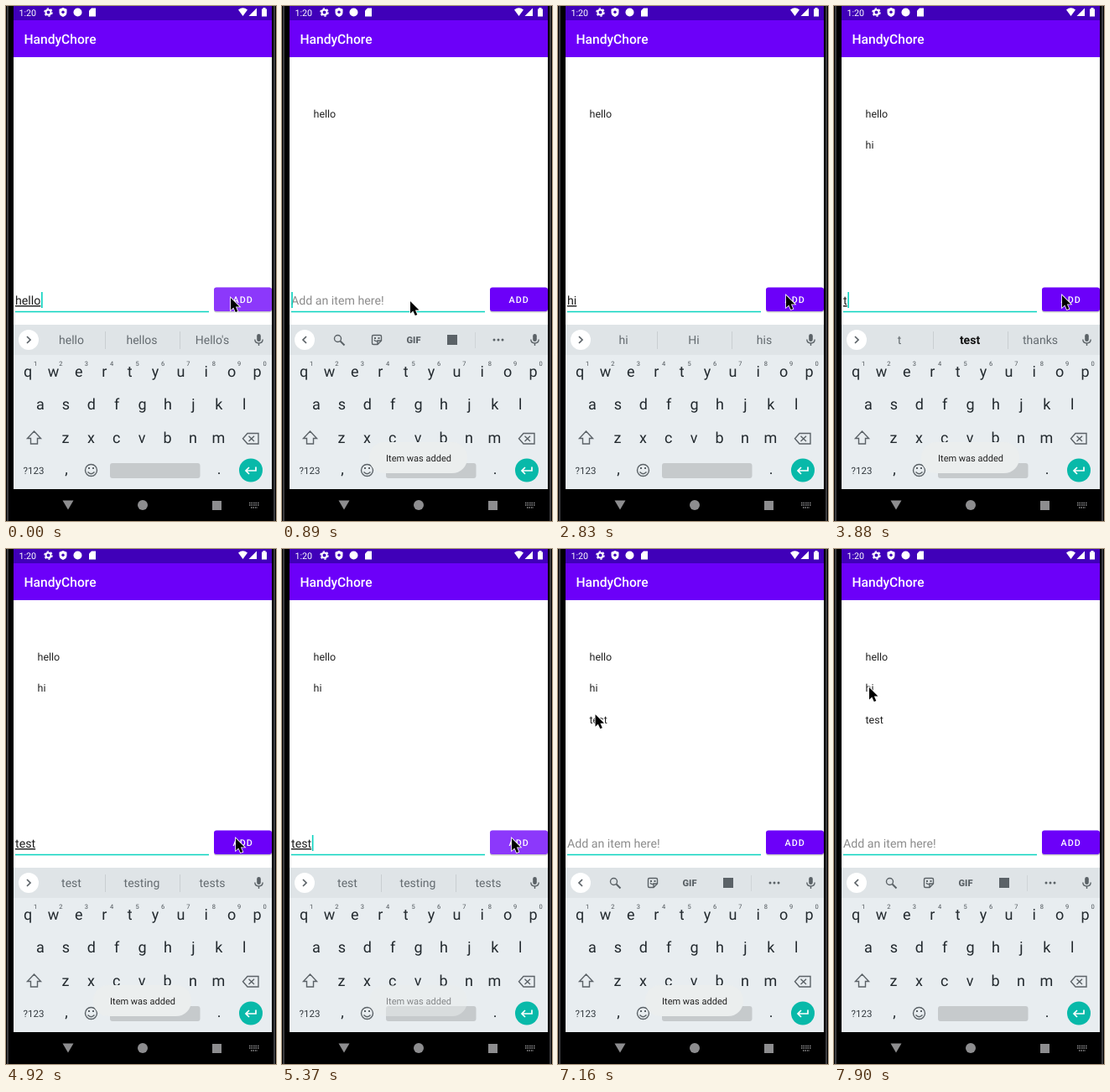
Write an HTML page that moves like this. It is 322 px wide and 614 px high and loops after 8 s.

```html
<!DOCTYPE html>
<html lang="en">
<head>
<meta charset="utf-8">
<style>
  html, body { margin: 0; width: 100%; height: 100%; overflow: hidden; background: #000; }
  svg { display: block; width: 322px; height: 614px; font-family: Roboto, sans-serif; text-rendering: geometricPrecision; }
  .mid { text-anchor: middle; }
  .line { fill: none; stroke: #5b6267; stroke-width: 1.4; }
  .icon { fill: #5b6267; }
  .key { font-size: 18px; fill: #22292e; text-anchor: middle; }
  .digit { font-size: 7.5px; fill: #4c5358; text-anchor: middle; }
  .word { font-size: 14px; fill: #646b70; text-anchor: middle; }
  .item { font-size: 12.5px; fill: #222; }
</style>
</head>
<body>
<svg viewBox="0 0 322 614">
  <!-- device and app -->
  <rect width="322" height="614"/>
  <path d="M2 0V614M320 0V614" stroke="#3c3c40" stroke-width="2"/>
  <rect x="9" width="308" height="17" fill="#4000b9"/>
  <rect x="9" y="17" width="308" height="44" fill="#6c00f9"/>
  <rect x="9" y="61" width="308" height="319" fill="#fff"/>
  <g fill="#fff">
    <text x="15.5" y="11.5" font-size="10.7">1:20</text>
    <circle cx="50.5" cy="7.5" r="3" fill="none" stroke="#fff" stroke-width="2"/>
    <circle cx="50.5" cy="7.5" r="4.6" fill="none" stroke="#fff" stroke-width="1.4" stroke-dasharray="2.4 2.4"/>
    <path d="M68 2L72.500 3.800V7.500Q72.500 11.500 68 13Q63.500 11.500 63.500 7.500V3.800Z"/>
    <circle cx="68" cy="7.300" r="1.700" fill="#4000b9"/>
    <circle cx="85.500" cy="7.500" r="5"/>
    <path d="M102 2.500H107V12.500H99V5.500Z"/>
    <path d="M277 4.500Q282.500 0 288 4.500L282.500 12Z"/>
    <path d="M299 2.500V12H289.500Z"/>
    <path d="M305 3.500H306.500V2H309.500V3.500H311V12.500H305Z"/>
    <text x="21.500" y="45" font-size="15.600" font-weight="500">HandyChore</text>
  </g>
  <g id="items"></g>
  <path d="M11 364.500H242" stroke="#0ad3c0" stroke-width="1.500"/>
  <text id="hint" x="11" y="356" font-size="14.200" fill="#8c8c8c">Add an item here!</text>
  <text id="input" x="11" y="356" font-size="14.200" fill="#1c1c1c" text-decoration="underline"></text>
  <rect id="caret" y="341" width="1.600" height="19" fill="#0ad3c0"/>
  <rect x="248" y="336.500" width="69" height="29" rx="3" fill="#000" opacity=".2"/>
  <rect x="248" y="335.500" width="69" height="28.500" rx="3" fill="#6c00f9"/>
  <rect id="ripple" x="248" y="335.500" width="69" height="28.500" rx="3" fill="#fff"/>
  <text x="270.500" y="354" font-size="10.800" font-weight="500" letter-spacing=".95" fill="#fff">ADD</text>

  <!-- keyboard -->
  <rect x="9" y="380" width="308" height="196" fill="#e8edf0"/>
  <rect x="9" y="380" width="308" height="36" fill="#dfe4e7"/>
  <circle cx="27" cy="398" r="12" fill="#fff"/>
  <path id="chevron" d="M-2 -4L2 0L-2 4" class="line" style="stroke-width:1.700"/>
  <g id="words">
    <path d="M118.500 388V409M207.500 388V409" stroke="#c9ced1"/>
    <text class="word" x="78" y="403"></text>
    <text class="word" x="162" y="403"></text>
    <text class="word" x="246" y="403"></text>
  </g>
  <g id="tools">
    <circle class="line" cx="66.500" cy="396.500" r="4"/>
    <path class="line" d="M69.500 399.500L74.500 404.500" style="stroke-width:2"/>
    <path class="line" d="M109 392.500H117Q118.500 392.500 118.500 394V399L114 403.500H109Q107.500 403.500 107.500 402V394Q107.500 392.500 109 392.500ZM114 403.500V399H118.500M110 398Q112 401 114.500 398.500"/>
    <path class="icon" d="M110 395h2v2h-2zM114.500 395h2v2h-2z"/>
    <text class="icon mid" x="157" y="402" font-size="11" font-weight="800">GIF</text>
    <rect class="icon" x="197" y="392" width="12" height="12"/>
    <path d="M230.500 389V408" stroke="#cfd4d7"/>
    <g class="icon"><circle cx="253" cy="398" r="1.500"/><circle cx="258" cy="398" r="1.500"/><circle cx="263" cy="398" r="1.500"/></g>
  </g>
  <rect class="icon" x="299.200" y="391" width="4.600" height="9" rx="2.300"/>
  <path class="line" d="M296.800 397.500Q297 402 301.500 402T306.200 397.500M301.500 402V405"/>
  <g id="keys"></g>
  <path class="line" d="M33.500 507L41.500 515.500H37.500V522H29.500V515.500H25.500Z"/>
  <path class="line" d="M288 509.500H301V522H288L282.500 515.800ZM289.500 512.700L296 519M296 512.700L289.500 519"/>
  <text class="mid" x="33" y="558" font-size="11.500" fill="#333a3f">?123</text>
  <circle class="line" cx="101.500" cy="553.500" r="7"/>
  <path class="line" d="M97.500 555.500Q101.500 560 105.500 555.500"/>
  <path class="icon" d="M98 550h2v2h-2zM103 550h2v2h-2z"/>
  <rect x="124" y="545" width="107.500" height="18" rx="3" fill="#c6cacc"/>
  <circle cx="292" cy="553.500" r="14" fill="#08b9a9"/>
  <path d="M298 549.500V554H286.500M290 550L286 554L290 558" fill="none" stroke="#fff" stroke-width="1.700"/>

  <!-- navigation bar -->
  <g fill="#8d8d8f">
    <path d="M67.500 589.500H80.500L74 600.500Z"/>
    <circle cx="163" cy="595" r="6"/>
    <rect x="246" y="590" width="11" height="11"/>
    <path d="M290 592.500H302M290 595H302M292 598H300" fill="none" stroke="#8d8d8f" stroke-width="1.500" stroke-dasharray="1.500 1"/>
  </g>

  <g id="toast">
    <rect x="104" y="520" width="117" height="37" rx="18" fill="#ebeeee"/>
    <text class="mid" x="163" y="542.500" font-size="11" fill="#222">Item was added</text>
  </g>
  <path id="mouse" d="M0 0V14.500L3.300 11.500L5.800 17L8.300 16L5.900 10.500H10.500Z" stroke="#fff" stroke-width="1.600" paint-order="stroke"/>
</svg>
<script>
const $ = id => document.getElementById(id);
const DURATION = 8000, TICK = 149.1;
const show = (el, on) => el.setAttribute('visibility', on ? 'visible' : 'hidden');

function addText(parent, cls, x, y, content) {
  const el = document.createElementNS('http://www.w3.org/2000/svg', 'text');
  el.setAttribute('class', cls);
  el.setAttribute('x', x);
  el.setAttribute('y', y);
  el.textContent = content;
  parent.append(el);
  return el;
}

[['qwertyuiop', 26, 442], ['asdfghjkl', 41, 481], ['zxcvbnm', 71, 521]].forEach(([letters, x0, y], row) =>
  [...letters].forEach((letter, i) => {
    const x = x0 + i * 30.4;
    addText($('keys'), 'key', x, y, letter);
    if (!row) addText($('keys'), 'digit', x + 9, 429, (i + 1) % 10);
  }));
addText($('keys'), 'key', 72, 558, ',');
addText($('keys'), 'key', 254, 558, '.');

// [tick, typed text, suggestions]
const typing = [
  [0, 'hello', ['hello', 'hellos', "Hello's"]],
  [1, ''],
  [15, 'h', ['h', 'he', 'how']],
  [16, 'hi', ['hi', 'Hi', 'his']],
  [22, ''],
  [26, 't', ['t', 'test', 'thanks']],
  [27, 'te', ['te', 'test', 'tea']],
  [29, 'tes', ['tes', 'test', 'tests']],
  [30, 'test', ['test', 'testing', 'tests']],
  [37, '']
];
const added = [1, 22, 37];
const items = ['hello', 'hi', 'test'].map((name, i) => addText($('items'), 'item', 37.5, 132.5 + i * 37.6, name));

// [tick, x, y]
const mousePath = [
  [0, 268, 348], [2, 268, 348], [6, 153, 352], [12, 153, 352], [18, 272, 345], [32, 272, 345],
  [33, 274, 345], [36, 274, 345], [39, 134, 212], [40, 73, 197], [43, 68, 199], [46, 45, 203],
  [47, 45, 203], [51, 42, 166], [53, 42, 165]
];
const words = [...$('words').querySelectorAll('text')];

function mouseAt(tick) {
  const i = Math.max(1, mousePath.findIndex(p => p[0] >= tick));
  const [t0, x0, y0] = mousePath[i - 1], [t1, x1, y1] = mousePath[i];
  const u = (tick - t0) / (t1 - t0), e = u * u * (3 - 2 * u);
  return [x0 + (x1 - x0) * e, y0 + (y1 - y0) * e];
}

function toastOpacity(age) {
  if (age < 0 || age > 13) return 0;
  return age === 0 || age === 13 ? .5 : 1;
}

function draw(time) {
  const tick = Math.min(53, Math.floor((time + 10) / TICK));
  const [start, typed, suggestions] = typing.findLast(entry => entry[0] <= tick);

  $('input').textContent = typed;
  show($('hint'), !typed);
  const blinkAge = tick - start + (typed ? 1 : 2);
  show($('caret'), Math.floor(blinkAge / 3.4) % 2 === 0);
  $('caret').setAttribute('x', 11.2 + (typed ? $('input').getComputedTextLength() + .5 : 0));

  const toolbar = !suggestions || tick < start;
  show($('tools'), toolbar);
  show($('words'), !toolbar);
  $('chevron').setAttribute('transform', `translate(27 398) scale(${toolbar ? -1 : 1} 1)`);
  words.forEach((el, i) => {
    const bold = i === 1 && /^(t|te|tes)$/.test(typed);
    el.textContent = toolbar ? '' : suggestions[i];
    el.style.fontWeight = bold ? 700 : 400;
    el.style.fill = bold ? '#111' : '';
  });

  items.forEach((el, i) => show(el, tick >= added[i]));
  $('toast').setAttribute('opacity', Math.max(...added.map(t => toastOpacity(tick - t - 1))));
  $('ripple').setAttribute('opacity', Math.max(...added.map(t => [.1, .22, .18, .08][tick - t + 2] || 0)));
  $('mouse').setAttribute('transform', `translate(${mouseAt(tick)})`);
}

function loop() {
  draw(performance.now() % DURATION);
  requestAnimationFrame(loop);
}
loop();
</script>
</body>
</html>
```
